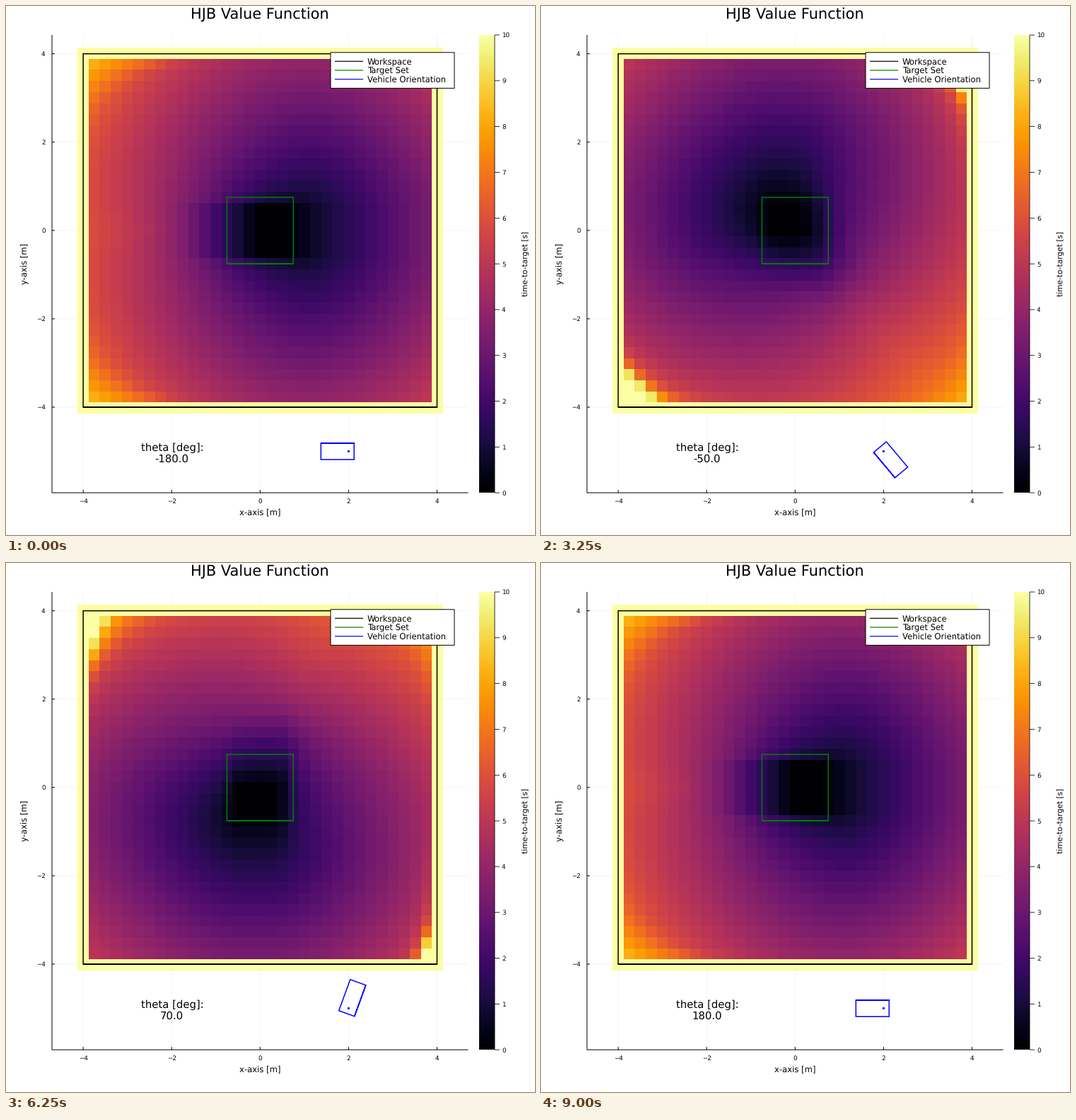
These frames come from a looping animation (748 px wide and 749 px high, 9.25 s). A matplotlib script:

```python
import numpy as np
import matplotlib.pyplot as plt
from matplotlib.animation import FuncAnimation

W, H, DPI = 748, 749, 64
X0, Y0, SCALE = 359.3, 317.8, 62.54        # pixel position of the origin, pixels per metre
LEFT, RIGHT, TOP, BOTTOM = 65, 653.5, 41, 689.2

STEP = 0.25                                # grid spacing [m]
TURN = np.radians(10)                      # heading spacing
N = 33
RADIUS = 0.5 / np.tan(0.5)                 # wheelbase 0.5 m, steering limit 0.5 rad
SPEEDS = {1: 1.0, -1: 0.5}                 # forward and reverse [m/s]
BLOCKED = 50.0                             # time-to-target assigned to the walls
BODY = np.array([(-0.125, -0.1875), (0.625, -0.1875), (0.625, 0.1875), (-0.125, 0.1875)])
TARGET = 0.75

plt.rcParams["font.family"] = "DejaVu Sans"
plt.rcParams["text.hinting"] = "no_hinting"


def body_corners(theta):
    c, s = np.cos(theta), np.sin(theta)
    return BODY @ np.array([[c, s], [-s, c]])


def solve_value():
    """Upwind value iteration of the time-to-target, indexed [heading, y, x]."""
    thetas = np.radians(np.arange(-180, 180, 10))
    axis = np.linspace(-4, 4, N)
    gx, gy = np.meshgrid(axis, axis)

    target = np.ones((len(thetas), N, N), bool)
    for k, theta in enumerate(thetas):
        for dx, dy in body_corners(theta):
            target[k] &= (abs(gx + dx) <= TARGET + 1e-9) & (abs(gy + dy) <= TARGET + 1e-9)
    fixed = target.copy()
    fixed[:, [0, -1], :] = True
    fixed[:, :, [0, -1]] = True

    value = np.full(target.shape, BLOCKED)
    value[target] = 0
    held = value.copy()
    cos = np.cos(thetas)[:, None, None]
    sin = np.sin(thetas)[:, None, None]
    wx, wy, wt = abs(cos), abs(sin), STEP / (RADIUS * TURN)

    for _ in range(800):
        east, west = np.roll(value, -1, 2), np.roll(value, 1, 2)
        north, south = np.roll(value, -1, 1), np.roll(value, 1, 1)
        turned = np.minimum(np.roll(value, 1, 0), np.roll(value, -1, 0))
        best = value
        for way, speed in SPEEDS.items():
            ahead = (STEP / speed + wx * np.where(way * cos > 0, east, west)
                     + wy * np.where(way * sin > 0, north, south))
            best = np.minimum(best, ahead / (wx + wy))
            best = np.minimum(best, (ahead + wt * turned) / (wx + wy + wt))
        best = np.where(fixed, held, best)
        change = np.max(value - best)
        value = best
        if change < 1e-4:
            break
    return value


def px(x):
    return X0 + SCALE * np.asarray(x)


def py(y):
    return Y0 - SCALE * np.asarray(y)


def pt(pixels):
    return pixels * 72 / DPI


fig = plt.figure(figsize=(W / DPI, H / DPI), dpi=DPI, facecolor="white")
ax = fig.add_axes([0, 0, 1, 1])
ax.axis("off")


def line(xs, ys, color="black", width=1.0, z=3):
    return ax.plot(xs, ys, color=color, lw=pt(width), zorder=z, snap=False,
                   solid_capstyle="butt", solid_joinstyle="miter")[0]


def text(x, y, label, size, ha="center", va="baseline", rotation=0):
    return ax.text(x, y, label, fontsize=pt(size), ha=ha, va=va, rotation=rotation, zorder=6)


def square(half, color):
    line(px(half * np.array([-1, 1, 1, -1, -1, 1])),
         py(half * np.array([-1, -1, 1, 1, -1, -1])), color, 1.5)


# Axes, grid and ticks
line([LEFT, LEFT], [TOP, BOTTOM])
line([LEFT, RIGHT], [BOTTOM, BOTTOM])
for v in range(-4, 5, 2):
    line([px(v)] * 2, [TOP, BOTTOM], "#f1f1f1", 0.8, 0)
    line([LEFT, RIGHT], [py(v)] * 2, "#f1f1f1", 0.8, 0)
    line([px(v)] * 2, [BOTTOM, BOTTOM - 4])
    line([LEFT, LEFT + 4], [py(v)] * 2)
    label = str(v).replace("-", "\u2212")
    text(px(v), 704, label, 8.8)
    text(55.5, py(v) + 3.3, label, 8.8, "right")

text(359.3, 18.5, "HJB Value Function", 20.85)
text(359.5, 720, "x-axis [m]", 11.6)
text(26, 365, "y-axis [m]", 11.6, va="center", rotation=90)
text(734.5, 365, "time-to-target [s]", 10.6, va="center", rotation=90)

# Value map and colour bar, both on whole pixels
VALUE = solve_value()
heat = ax.imshow(VALUE[0], cmap="inferno", vmin=0, vmax=10, origin="lower",
                 interpolation="nearest", aspect="auto", zorder=1,
                 extent=(101, 618, 577, 59))
ax.imshow(np.linspace(0, 1, 256)[:, None], cmap="inferno", origin="lower",
          interpolation="nearest", aspect="auto", zorder=1, extent=(669, 691, 689, 41))
line([691, 691], [TOP, BOTTOM], width=0.8)
for v in range(11):
    y = BOTTOM - 64.82 * v
    line([691, 698], [y, y], width=0.8)
    text(701, y + 3.3, str(v), 8.8, "left")

square(4, "black")
square(TARGET, "green")

# Legend
ax.add_patch(plt.Rectangle((459, 65.8), 175, 50.6, fc="white", ec="black",
                           lw=pt(1), snap=False, zorder=4))
for i, (name, color) in enumerate([("Workspace", "black"), ("Target Set", "green"),
                                   ("Vehicle Orientation", "blue")]):
    y = 78.3 + 12.7 * i
    line([465, 505], [y, y], color, 1.2, 5)
    text(511, y + 4.1, name, 11.6, "left")

# Vehicle and heading readout
vehicle = line([], [], "blue", 1.5)
ax.add_patch(plt.Circle((px(2), py(-5)), 1.6, color="blue", lw=0, zorder=4))
text(235, 630, "theta [deg]:", 14.9)
readout = text(234.5, 646, "", 14.9)

ax.set_xlim(0, W)
ax.set_ylim(H, 0)


def update(frame):
    degrees = -180 + 10 * frame
    heat.set_data(VALUE[frame % len(VALUE)])
    corners = body_corners(np.radians(degrees))
    outline = np.vstack([corners, corners[:2]])
    vehicle.set_data(px(2 + outline[:, 0]), py(-5 + outline[:, 1]))
    readout.set_text(f"{degrees:.1f}")
    return heat, vehicle, readout


anim = FuncAnimation(fig, update, frames=37, interval=250, repeat=True, repeat_delay=0)
plt.show()
```
